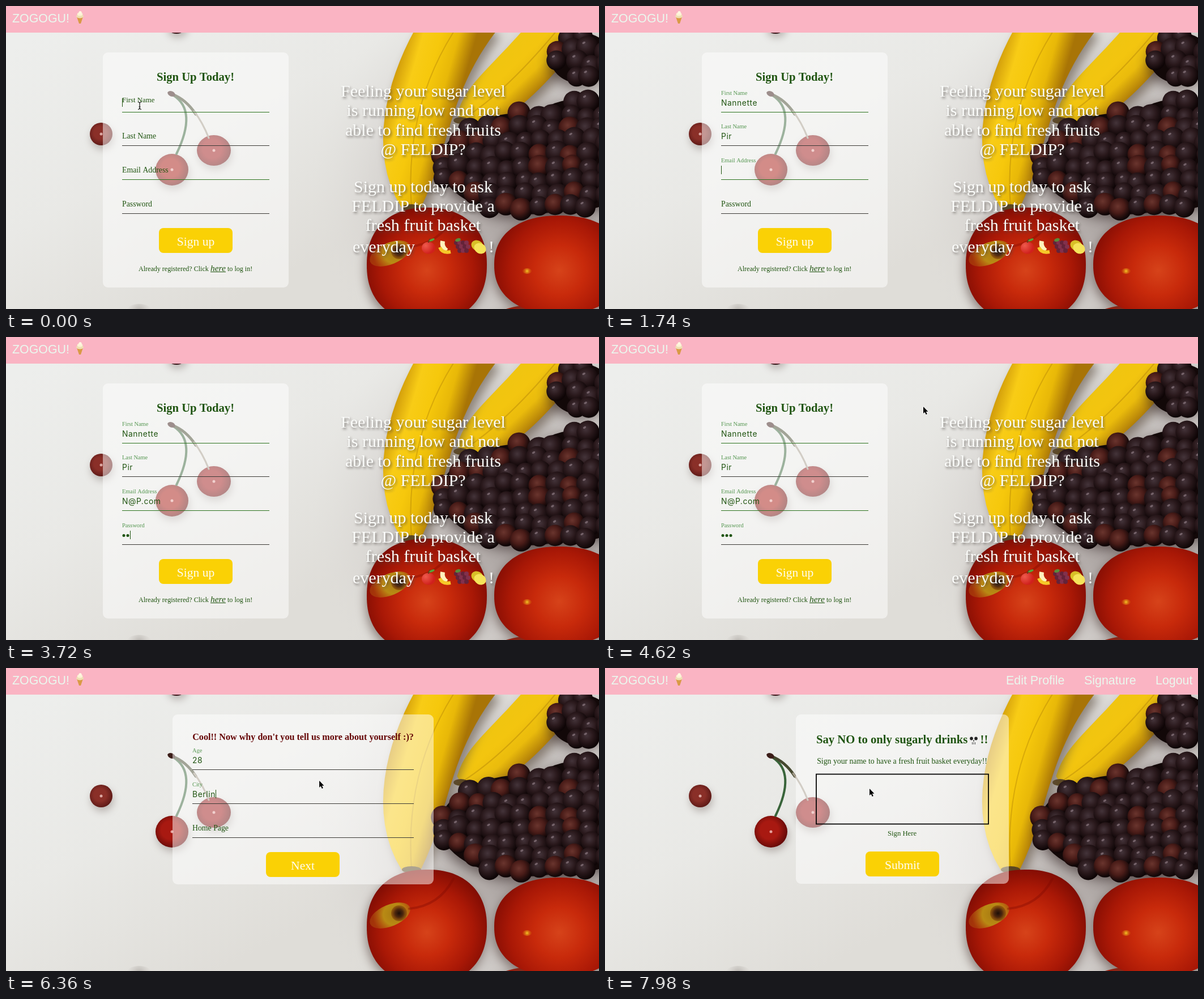
An HTML page with a canvas for the animation above (8 s loop, 1047 by 535 pixels).

```html
<!DOCTYPE html>
<html lang="en">
<head>
<meta charset="utf-8">
<title>Fruit basket sign up</title>
<style>
  html, body { margin: 0; width: 100%; height: 100%; overflow: hidden; background: #ecedeb; }
  canvas { display: block; width: 1047px; height: 535px; }
</style>
</head>
<body>
<canvas id="stage" width="1047" height="535"></canvas>
<script>
const W = 1047, H = 535, LOOP = 8000, TOP = 47;
const SERIF = '"Liberation Serif", "Times New Roman", serif';
const SANS = '"Liberation Sans", Arial, sans-serif';
const INPUT = 'Inter, Roboto, sans-serif';
const GREEN = '#1f5410', PALE = '#549650', MINT = '#eaf8ee', YELLOW = '#fad105';
const PROFILE_AT = 4720, SIGN_AT = 7480, HOVER_AT = 6490;
const stage = document.getElementById('stage').getContext('2d');
let c = stage;

const clamp = v => Math.max(0, Math.min(1, v));
const mix = (a, b, p) => a + (b - a) * p;
const smooth = p => p * p * (3 - 2 * p);

function text(s, x, y, font, color, align = 'left', spacing = 0) {
  c.font = font;
  c.textAlign = align;
  c.letterSpacing = spacing + 'px';
  c.fillStyle = color;
  c.fillText(s, x, y);
  const w = c.measureText(s).width;
  c.letterSpacing = '0px';
  return w;
}

function oval(x, y, rx, ry, fill, turn = 0) {
  c.beginPath();
  c.ellipse(x, y, rx, ry, turn, 0, 7);
  c.fillStyle = fill;
  c.fill();
}

function fade(g, stops) {
  stops.forEach((s, i) => g.addColorStop(i / (stops.length - 1), s));
  return g;
}
const radial = (x, y, r, ...stops) => fade(c.createRadialGradient(x, y, 0, x, y, r), stops);
const linear = (x0, y0, x1, y1, ...stops) => fade(c.createLinearGradient(x0, y0, x1, y1), stops);

function curve(width, color, x0, y0, x1, y1, x2, y2) {
  c.beginPath();
  c.moveTo(x0, y0);
  c.quadraticCurveTo(x1, y1, x2, y2);
  c.lineWidth = width;
  c.strokeStyle = color;
  c.stroke();
}

function shadow(color, blur, dx, dy) {
  c.shadowColor = color;
  c.shadowBlur = blur;
  c.shadowOffsetX = dx;
  c.shadowOffsetY = dy;
}
const noShadow = () => shadow('transparent', 0, 0, 0);

function seeded(seed) {
  return () => (seed = (seed * 16807) % 2147483647) / 2147483647;
}

function cherry(x, y, rx, ry, light, dark) {
  shadow('rgba(110,95,90,.4)', 14, 2, 7);
  oval(x, y, rx, ry, radial(x - rx * .1, y - ry * .1, rx * 1.1, light, light, dark));
  noShadow();
  oval(x, y, 2.5, 2.5, 'rgba(255,220,215,.7)');
}

function cherries() {
  cherry(301, 35, 17, 14, '#3c1216', '#2a0d10');
  cherry(168, 226, 20, 20, '#8a2f28', '#5f1a17');
  cherry(293, 289, 29, 28, '#a81911', '#650a08');
  cherry(367, 255, 30, 27, '#a01a1a', '#650c0c');
  c.lineCap = 'round';
  curve(4, '#39643a', 296, 158, 338, 185, 301, 261);
  curve(5, '#45482f', 294, 156, 318, 165, 335, 191);
  curve(3, '#a59c8c', 332, 186, 347, 205, 358, 233);
  oval(292, 155, 7, 4.5, '#3b1d18', .4);
}

// A tapering band along the quadratic spine a, b, d
function banana(a, b, d, half, ...stops) {
  const sides = [[], []];
  const at = (i, t) => mix(mix(a[i], b[i], t), mix(b[i], d[i], t), t);
  for (let t = 0; t <= 1.001; t += .05) {
    const dx = mix(b[0] - a[0], d[0] - b[0], t), dy = mix(b[1] - a[1], d[1] - b[1], t);
    const r = half * (1 - .72 * t ** 5) / Math.hypot(dx, dy);
    sides[0].push([at(0, t) - dy * r, at(1, t) + dx * r]);
    sides[1].unshift([at(0, t) + dy * r, at(1, t) - dx * r]);
  }
  const shape = sides.flat(), mid = at(0, .5), midY = at(1, .5);
  const span = Math.hypot(d[0] - a[0], d[1] - a[1]);
  const nx = (d[1] - a[1]) / span * half, ny = (a[0] - d[0]) / span * half;
  c.beginPath();
  shape.forEach(p => c.lineTo(...p));
  c.closePath();
  c.fillStyle = linear(mid - nx, midY - ny, mid + nx, midY + ny, ...stops);
  shadow('rgba(90,75,60,.6)', 18, 8, 8);
  c.fill();
  noShadow();
  curve(2, 'rgba(150,100,5,.3)', ...a, ...b, ...d);
  oval(...d, half * .28, 6, '#5c4720');
}

function bananas() {
  banana([985, 28], [886, 151], [803, 202], 46, '#f0c510', '#f3c50f', '#eabb0c', '#b07d08');
  banana([815, 10], [702, 160], [716, 356], 61, '#cf9a0a', '#f8cc16', '#f6c80c', '#e8b808', '#a87406');
}

function grapes() {
  const rnd = seeded(77);
  // centre and radii of the bunches
  const bunches = [[920, 278, 154, 90], [1012, 262, 112, 98], [1015, 92, 54, 45]];
  const inside = (x, y) => bunches.some(([cx, cy, rx, ry]) => ((x - cx) / rx) ** 2 + ((y - cy) / ry) ** 2 < 1);
  shadow('rgba(50,35,35,.6)', 22, -3, 8);
  for (const [x, y, rx, ry] of bunches) oval(x, y, rx, ry, '#120808');
  noShadow();
  for (let y = 50; y < 400; y += 23)
    for (let x = 755 + rnd() * 14; x < 1070; x += 29) {
      const gx = x + rnd() * 9, gy = y + rnd() * 10, r = 17 + rnd() * 4, tone = rnd();
      if (!inside(gx, gy)) continue;
      const rim = tone > .85 ? '#4a1c18' : '#2a191c';
      oval(gx, gy, r, r, radial(gx - r * .2, gy - r * .25, r * 1.2, tone > .85 ? '#6a352e' : '#44343a', rim, '#0e0506'));
      if (tone < .5) oval(gx - r * .3, gy - r * .4, 3, 1.8, 'rgba(200,180,190,.4)', -.5);
    }
}

// Rounded square-ish fruit: a superellipse
function peach(x, y, rx, ry) {
  const bend = v => Math.sign(v) * Math.abs(v) ** .88;
  c.beginPath();
  for (let a = 0; a < 6.28; a += .05) c.lineTo(x + rx * bend(Math.cos(a)), y + ry * bend(Math.sin(a)));
  c.fillStyle = radial(x, y + 10, rx * 1.15, '#d6431a', '#c82a0b', '#a91806', '#780a03');
  shadow('rgba(75,55,50,.55)', 18, -2, 8);
  c.fill();
  noShadow();
}

function peaches() {
  peach(945, 588, 110, 61);
  peach(977, 457, 115, 87);
  peach(743, 457, 106, 101);
  oval(678, 437, 38, 19, radial(685, 435, 38, '#a87c12', '#b98a14', 'rgba(175,85,14,.5)'), -.4);
  oval(694, 433, 14, 14, radial(694, 433, 14, '#1c0f08', '#4c260d', 'rgba(110,40,5,.4)'));
  curve(4, 'rgba(120,8,0,.35)', 712, 425, 765, 420, 790, 372);
  oval(920, 468, 8, 5, radial(920, 468, 7, '#f2cb28', 'rgba(215,100,10,.3)'));
}

function makePhoto() {
  const pic = document.createElement('canvas');
  pic.width = W;
  pic.height = H;
  c = pic.getContext('2d');
  c.fillStyle = linear(60, 47, 330, 560, '#edeeec', '#e9e9e6', '#dfddd8');
  c.fillRect(0, 0, W, H);
  c.fillStyle = radial(930, 330, 390, 'rgba(140,130,128,.95)', 'rgba(190,184,182,.65)', 'rgba(222,220,218,0)');
  c.fillRect(0, 0, W, H);
  oval(235, 538, 22, 12, radial(235, 538, 22, 'rgba(165,160,155,.7)', 'rgba(200,195,190,0)'));
  cherries();
  bananas();
  grapes();
  peaches();
  c.fillStyle = '#fab4c3';
  c.fillRect(0, 0, W, TOP);
  c = stage;
  return pic;
}

function iceCream() {
  c.fillStyle = '#d99a45';
  c.fill(new Path2D('M125 19H136L132 31H129Z'));
  oval(130.5, 18, 6.5, 3.5, '#eedfb4');
  oval(130.5, 14.5, 4.8, 3, '#fbf3d5');
  oval(131, 11.5, 2.6, 2.6, '#fff8e0');
}

function fruitIcons() {
  oval(746, 427, 12, 10.5, radial(741, 423, 15, '#ee5b4d', '#d0201d'));
  curve(2, '#6b3f1d', 746, 418, 746, 414, 749, 411);
  oval(752, 413, 5, 2, '#57a33a', -.4);

  curve(8, '#fff2bd', 771, 415, 769, 426, 778, 432);
  curve(6, '#f6c829', 766, 426, 770, 437, 785, 434);

  for (let i = 0; i < 11; i++)
    oval(795 + (i % 4) * 6 + (i >> 2) * 3, 418 + (i >> 2) * 7, 4, 4, i % 2 ? '#82304c' : '#642339');
  oval(798, 413, 5, 3, '#5a8b3b', -.3);

  oval(832, 423, 11, 9, '#d8bf28', .5);
  oval(837, 428, 11, 9, '#f5e35a', .5);
}

function slogan() {
  const font = '30px ' + SERIF, white = '#fbfcfa';
  shadow('rgba(70,65,60,.65)', 4, 2, 3);
  ['Feeling your sugar level', 'is running low and not', 'able to find fresh fruits', '@ FELDIP?', '',
    'Sign up today to ask', 'FELDIP to provide a', 'fresh fruit basket']
    .forEach((s, i) => text(s, 736.5, 160 + i * 34.4 - (i > 4 ? 3.5 : 0), font, white, 'center'));
  text('everyday', 612, 435, font, white);
  text('!', 852, 435, font, white);
  noShadow();
  fruitIcons();
}

function card(x, y, w, h) {
  c.beginPath();
  c.roundRect(x, y, w, h, 9);
  c.fillStyle = 'rgba(255,255,255,.5)';
  c.fill();
}

function button(label, x, y, sx = 1, sy = 1) {
  c.save();
  c.translate(x, y);
  c.scale(sx, sy);
  c.beginPath();
  c.roundRect(-65, -22, 130, 44, 8);
  c.fillStyle = YELLOW;
  c.fill();
  text(label, 0, 8.5, '21.5px ' + SERIF, '#fffdf2', 'center');
  c.restore();
}

// on, off: focus times; the keys begin at `start`, one every `gap`
function field(t, f) {
  const p = smooth(clamp((t - f.on) / 220));
  const count = Math.min(f.value.length, Math.max(0, Math.floor((t - f.start) / f.gap) + 1));
  c.fillStyle = f.color || '#3b3a36';
  c.fillRect(f.x, f.y, f.w, 1);
  text(f.label, f.x, mix(f.y - 12.5, f.y - 30.5, p), `${mix(13.8, 10.35, p)}px ${SERIF}`, p > .6 ? PALE : GREEN);
  let end = 0;
  if (f.secret) {
    for (let i = 0; i < count; i++) oval(f.x + 3 + i * 7, f.y - 15.5, 2.5, 2.5, GREEN);
    end = count * 7;
  } else if (count) {
    end = text(f.value.slice(0, count), f.x, f.y - 11.5, '13.8px ' + INPUT, GREEN, 'left', .6);
  }
  const last = count ? f.start + (count - 1) * f.gap : f.on;
  if (t >= f.on && t < f.off && (t - last) % 1000 < 500) {
    c.fillStyle = GREEN;
    c.fillRect(Math.round(f.x + end), f.y - 24, 1, 15);
  }
}

const left = { x: 205, w: 260 }, mid = { x: 329, w: 391 }, leaf = '#2d7420';
const signUp = [
  { ...left, y: 187, label: 'First Name', value: 'Nannette', on: -75, off: 1000, start: 200, gap: 95, color: leaf },
  { ...left, y: 246, label: 'Last Name', value: 'Pir', on: 1000, off: 1480, start: 1130, gap: 100 },
  { ...left, y: 306, label: 'Email Address', value: 'N@P.com', on: 1480, off: 3350, start: 2000, gap: 200, color: leaf },
  { ...left, y: 366, label: 'Password', value: '***', on: 3350, off: 4300, start: 3560, gap: 145, secret: true }
];
const profile = [
  { ...mid, y: 179, label: 'Age', value: '28', on: 4880, off: 5740, start: 5500, gap: 100 },
  { ...mid, y: 239, label: 'City', value: 'Berlin', on: 5740, off: 6450, start: 5840, gap: 75 },
  { ...mid, y: 299, label: 'Home Page', value: '', on: LOOP, off: LOOP, start: LOOP, gap: 1 }
];

function signUpPage(t) {
  const small = '12.05px ' + SERIF;
  slogan();
  card(171, 82, 328, 415);
  text('Sign Up Today!', 334.5, 131.5, 'bold 20.7px ' + SERIF, GREEN, 'center');
  signUp.forEach(f => field(t, f));
  button('Sign up', 335, 414);
  text('Already registered? Click ', 234, 467.5, small, GREEN);
  text('here', 361, 467.5, 'italic 15.4px ' + SERIF, GREEN);
  c.fillRect(361, 469, 27, 1);
  text('to log in!', 391, 467.5, small, GREEN);
}

function spinner() {
  c.beginPath();
  c.roundRect(711.5, 156.5, 7, 12, 3);
  c.fillStyle = '#fff';
  c.fill();
  c.lineWidth = 1;
  c.strokeStyle = '#b5b5b5';
  c.stroke();
  c.fillStyle = '#333';
  c.fill(new Path2D('M713 161H717L715 158.5ZM713 164H717L715 166.5Z'));
}

// Damped wobble: the button grows wide while it gets flat, and back
function wobble(p) {
  return p > 0 && p < 1 ? .35 * Math.exp(-3 * p) * Math.sin(2 * Math.PI * 2.69 * p) : 0;
}

function profilePage(t) {
  card(294, 82, 461, 300);
  text("Cool!! Now why don't you tell us more about yourself :)?", 524.5, 126.5, 'bold 16.15px ' + SERIF, '#650606', 'center');
  profile.forEach(f => field(t, f));
  if (t >= profile[0].on && t < profile[0].off) spinner();
  const s = wobble((t - HOVER_AT) / 1000);
  button('Next', 524, 347, 1 + s, 1 - s);
}

function skull() {
  oval(651, 123.5, 9, 8, '#f0f0ee');
  c.fillRect(646.5, 127, 9, 8);
  for (const side of [-4, 4]) oval(651 + side, 124.5, 2.8, 3, '#222');
  oval(651, 128.5, 1, 1.3, '#333');
  for (let x = 648; x < 655; x += 2.5) c.fillRect(x, 131, .8, 4);
}

function signPage() {
  const nav = '21.4px ' + SANS, title = 'bold 20.7px ' + SERIF;
  text('Edit Profile', 708, 28.5, nav, MINT);
  text('Signature', 846, 28.5, nav, MINT);
  text('Logout', 972, 28.5, nav, MINT);
  card(337, 82, 376, 299);
  text('Say NO to only sugarly drinks', 373, 133, title, GREEN);
  text('!!', 662.5, 133, title, GREEN);
  skull();
  text('Sign your name to have a fresh fruit basket everyday!!', 524.5, 169, '13.8px ' + SERIF, GREEN, 'center');
  c.lineWidth = 1.8;
  c.strokeStyle = '#050505';
  c.strokeRect(373, 187.5, 304, 88);
  text('Sign Here', 524.5, 295.5, '12.7px ' + SERIF, GREEN, 'center');
  button('Submit', 525, 346);
}

function outline(d, width, line, fill) {
  const p = new Path2D(d);
  c.lineWidth = width;
  c.strokeStyle = line;
  c.stroke(p);
  c.fillStyle = fill;
  c.fill(p);
}
const pointers = {
  none() {},
  beam: () => outline('M-3-6.5Q0-6.5 0-4V4Q0 6.5-3 6.5M3-6.5Q0-6.5 0-4M0 4Q0 6.5 3 6.5M-1.5 2H1.5', 1.2, '#111', 'transparent'),
  arrow: () => outline('M0 0V12L2.7 9.5 4.8 14 6.8 13 4.7 8.8H8.5Z', 1.2, '#fff', '#000'),
  hand: () => outline('M-3 1V-6Q-3-8-1.5-8T0-6V-2Q2-3 3-1Q5-2 6-.5Q8-1 8 1V4Q8 7 5 8H-1Q-3 6-6 2Q-5-1-3 1Z', 1.8, '#111', '#fff')
};

// Each step glides from the last place to a new one
const steps = [
  { at: 0, shape: 'beam', x: 236, y: 176 },
  { at: 200, shape: 'none', x: 236, y: 176 },
  { at: 4240, shape: 'arrow', x: 562, y: 123 },
  { at: 4640, shape: 'arrow', x: 556, y: 170 },
  { at: 4880, shape: 'beam', x: 556, y: 170 },
  { at: 5500, shape: 'none', x: 556, y: 170 },
  { at: 6300, shape: 'arrow', x: 538, y: 350 },
  { at: HOVER_AT, shape: 'hand', x: 538, y: 350 },
  { at: SIGN_AT, shape: 'arrow', x: 467, y: 213 }
];

function pointer(t) {
  const i = steps.findLastIndex(s => s.at <= t), to = steps[i], from = steps[Math.max(0, i - 1)];
  const p = smooth(clamp((t - to.at) / 240));
  c.save();
  c.translate(mix(from.x, to.x, p), mix(from.y, to.y, p));
  pointers[to.shape]();
  c.restore();
}

const photo = makePhoto();

function draw(now) {
  const t = now % LOOP;
  c.drawImage(photo, 0, 0);
  text('ZOGOGU!', 11, 28.5, '21.4px ' + SANS, MINT);
  iceCream();
  if (t < PROFILE_AT) signUpPage(t);
  else if (t < SIGN_AT) profilePage(t);
  else signPage();
  pointer(t);
}

const begin = performance.now();
function tick() {
  draw(performance.now() - begin);
  requestAnimationFrame(tick);
}
tick();
</script>
</body>
</html>
```
